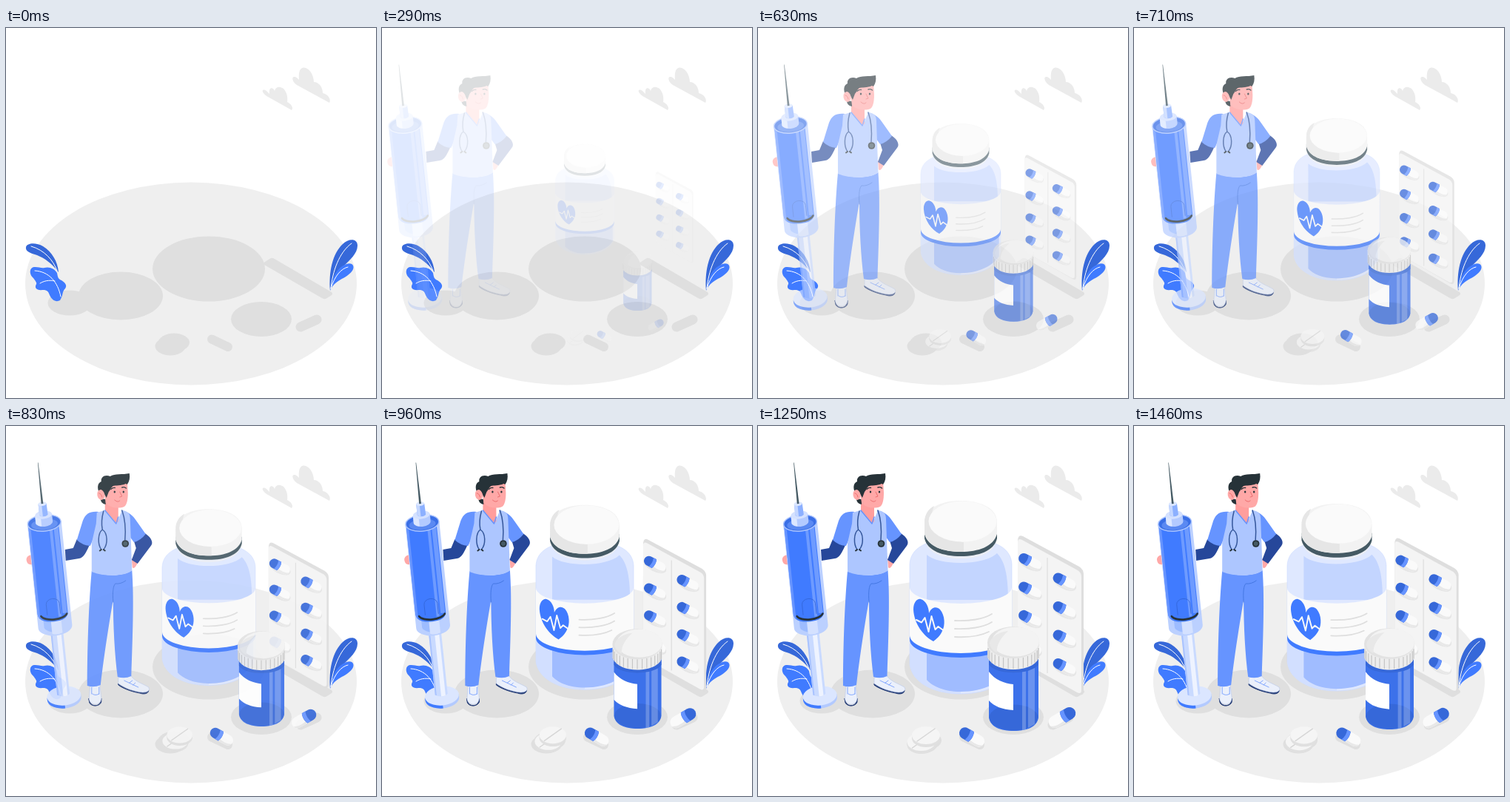
Write an HTML page that moves like this. It is 500x500 px and loops after 1.5 s.

```html
<!DOCTYPE html>
<html lang="en">
<head>
<meta charset="utf-8">
<title>Medicine</title>
<style>
html, body { margin: 0; width: 100%; height: 100%; overflow: hidden; background: #fff; }
svg { display: block; width: 100vw; height: 100vh; }
.line { fill: none; stroke-linecap: round; stroke-linejoin: round; }
</style>
</head>
<body>
<svg viewBox="0 0 500 500">
  <defs>
    <g id="pill">
      <path d="M-1-7H9.500A7 7 0 0 1 9.500 7H-1Z" fill="#fafafa"/>
      <path d="M0 4C5 5 12 5 16 2C16 4 13 7 9.500 7H0Z" fill="#e8e8e8"/>
      <path d="M-1-7H-9.500A7 7 0 0 0-9.500 7H-1C1 3 1-3-1-7Z" fill="#3668d9"/>
      <path d="M-1-7H-6C-4-3-4 3-6 7H-1C1 3 1-3-1-7Z" fill="#6694ff"/>
    </g>
    <g id="blister">
      <ellipse cx="1" cy="1.500" rx="17.500" ry="8.500" transform="rotate(28)" fill="#e6e6e6"/>
      <use href="#pill" transform="rotate(28)"/>
    </g>
    <g id="tablet">
      <path d="M-19 0V4A19 12 0 0 0 19 4V0Z" fill="#e0e0e0"/>
      <ellipse rx="19" ry="12" fill="#f5f5f5"/>
      <path class="line" d="M-12 8L12-9" stroke="#d6d6d6" stroke-width="1.500"/>
    </g>
  </defs>

  <!-- floor -->
  <ellipse cx="250" cy="345.500" rx="224" ry="137" fill="#efefef"/>
  <g fill="#dfdfdf" stroke="#dfdfdf" stroke-width="0" stroke-linecap="round">
    <ellipse cx="274" cy="325.500" rx="76" ry="44"/>
    <ellipse cx="155" cy="362" rx="57" ry="32.500"/>
    <ellipse cx="86" cy="371.500" rx="29.500" ry="17"/>
    <ellipse cx="345" cy="393.500" rx="41" ry="23.500"/>
    <ellipse cx="227" cy="425" rx="21" ry="12.500"/>
    <ellipse cx="222" cy="430" rx="20.500" ry="12.500"/>
    <path d="M278 420.500L300 431" stroke-width="12"/>
    <path d="M398 404L420 394" stroke-width="13"/>
    <path d="M350 316L357 311.500Q359 310 362 311.500L440 357Q442 359 440 361L433 365.500Q430 367 427 365L349 320Q346 318 350 316Z"/>
  </g>

  <!-- clouds -->
  <g fill="#ebebeb">
    <path d="M437 101L393 77C386 72 386 65 390 66C392 66 394 68 396 70C395 60 397 54 402 53.500C409 53 416 63 416 73C423 73 428 80 428 88C435 89 440 97 437 101Z"/>
    <path d="M386 111L354 93C347 89 345 84 348 83.500C351 83 354 87 356 89C355 82 358 79 362 83L363 85C365 78 371 79 375 82C380 87 381 95 380 100C385 102 389 108 386 111Z"/>
  </g>

  <!-- plants -->
  <g fill="#3668d9">
    <path d="M438 355C436 330 441 305 455 292C463 284 475 284 475 294C475 305 464 314 456 322C447 331 440 340 438 355Z"/>
    <path d="M70 329C62 318 52 311 42 307C31 304 26 301 27 296C29 290 41 290 50 295C62 302 70 316 71 330Z"/>
  </g>
  <g fill="#407bff">
    <path d="M438 355C441 335 448 323 460 319C468 316 472 322 468 328C463 335 455 338 449 342C443 346 440 350 438 355Z"/>
    <path d="M73 368C68 371 62 368 59 361C57 356 56 354 50 354C41 355 38 351 41 346C42 344 39 341 37 338C32 334 31 326 36 323.500C42 322 47 325 52 324C58 322 66 325 69 331C70 336 70 339 75 341C80 344 83 348 80 352C76 356 77 360 75 364Z"/>
  </g>
  <path class="line" stroke="#fff" d="M439 352C441 330 450 303 467 291M439 352C444 335 453 325 462 323M34 295C52 300 64 314 69 328M39 328C58 329 70 343 74 363M46 345C54 340 62 341 66 342"/>

  <!-- nurse with syringe -->
  <g id="nurse">
    <path d="M41 174C35 174 32 178 33 182C34 187 38 188 43 187Z" fill="#ffa8a7"/>
    <g transform="translate(57 131) rotate(-6)">
      <path d="M-21 235V239A23 13 0 0 0 25 239V235Z" fill="#b3caff"/>
      <path d="M-21 236V239A23 13 0 0 0 2 252V248Z" fill="#407bff"/>
      <ellipse cx="2" cy="235" rx="23" ry="13" fill="#dbe6ff"/>
      <path d="M-7 145V233Q2 239 10 233V145Z" fill="#c9daff"/>
      <path d="M1 145V236Q5 236 7 235V145Z" fill="#eef3ff"/>
      <path d="M-7 145V233L-5 234V145Z" fill="#a9c3ff"/>
      <path d="M-23 0V141A23 12 0 0 0 23 141V0Z" fill="#bbd0ff"/>
      <path d="M-15 128V141A17 9 0 0 0 6 148V128Z" fill="#9dbcff"/>
      <path d="M-5 130V150Q1 153 9 150V130Z" fill="#d4e1ff"/>
      <path d="M-22 0V122Q-21 134 0 134Q17 134 19 124V0Z" fill="#407bff"/>
      <path d="M-22 4V122Q-21 128-19 129V8Z" fill="#6694ff"/>
      <path d="M6 8H10V128H6ZM12 8H18V124H12Z" fill="#fff" opacity=".24"/>
      <path class="line" d="M-9 124V110A9 7 0 0 1 9 110V124" stroke="#3264d6" stroke-width=".8"/>
      <path class="line" d="M-17.500 125A18 8 0 0 0 17.500 125" stroke="#263238" stroke-width="2.600"/>
      <ellipse rx="22.500" ry="11" fill="#3a6fe6" stroke="#a9c3ff" stroke-width="1.500"/>
      <ellipse cy="2" rx="18" ry="7.500" fill="#5a89f2"/>
      <path d="M-11.500-11V-1A11.500 6 0 0 0 11.500-1V-11Z" fill="#b3caff"/>
      <path d="M-4-9V4Q-8 4-11.500 0V-11Z" fill="#dce7ff"/>
      <ellipse cy="-11" rx="11.500" ry="5.500" fill="#d4e1ff"/>
      <path d="M-5.500-26V-11A6 3 0 0 0 6-11L5.500-26Z" fill="#8cb0ff"/>
      <path d="M-5.500-26V-11L-1-8V-26Z" fill="#c5d7ff"/>
      <ellipse cy="-26" rx="5.500" ry="2.800" fill="#dce7ff"/>
      <path d="M-1.500-26L-.3-82H.3L1.300-26Z" fill="#455a64"/>
    </g>

    <!-- shoes -->
    <path d="M117 368C118 381 134 381 134 368L134 373C132 379 121 380 118 374ZM157 348C170 357 182 360 198 357C198 362 191 363 186 361C174 359 162 354 157 350Z" fill="#263e78" stroke="#263e78"/>
    <g fill="#ebf0fb" stroke="#b9c8ea" stroke-width=".6">
      <path d="M119 349H132L134 368C133 378 120 379 117.500 369Z"/>
      <path d="M157 340L173 336C178 345 190 348 198 353C200 357 197 360 190 360C178 359 165 354 157 348Z"/>
    </g>
    <path class="line" stroke="#6694ff" stroke-width=".8" d="M121 353V362M131 353V362M122 362Q126 365 131 362M165 344L184 353M172 347L176 344M177 350L180 347"/>

    <path d="M121 196C140 204 165 203 175.500 195C178 230 177 270 174.500 338Q166 342 156 339C152 310 150 270 150 235C147 252 139 300 133 350Q124 354 115 351C115 300 117 240 121 196Z" fill="#6694ff"/>
    <path class="line" stroke="#4477e3" d="M150 238C149 224 150 216 153 213Q160 214 167 209"/>

    <!-- arms -->
    <path d="M101 153L118 161C113 172 110 178 104 179L86 182L85 167L96 165Z" fill="#26479a"/>
    <path d="M175 179L184 182C182 189 178 194 176 191Z" fill="#ffa8a7"/>
    <path d="M193 145C201 150 205 157 201 162L183 186L175 181L181 165L178 155Z" fill="#26479a"/>
    <path d="M130 116C119 115 113 118 109 128L101 154Q108 161 119 162L132 132ZM161 114C171 116 177 121 182 129L194 146Q187 155 178 157L164 138Z" fill="#6694ff"/>
    <path d="M128 117L142 113L155 131L162 114C170 115 173 118 173 126L175.500 195C169 202 141 205 121 197L121 158L127 132Z" fill="#adc6ff"/>

    <!-- head -->
    <path d="M139 100L157 108V129L154 132L139 114Z" fill="#ff9e9d"/>
    <path class="line" d="M139 114L154 132L157 123" stroke="#6694ff" stroke-width="1.500"/>
    <path d="M133 98L140 99V106C135 105 133 102 133 98Z" fill="#263238"/>
    <path d="M137 82L140 104C146 111 158 112 165 109C169 106 170 98 170 90L169 74H150Z" fill="#ffa8a7"/>
    <path d="M131 90C128 83 129 77 134 75C133 69 139 65 146 68C152 64 163 66 172 64C173 70 172 75 169 79L167 78C161 81 153 80 150 81C147 83 146 87 144 89L141 97L137 90Z" fill="#263238"/>
    <ellipse cx="133.500" cy="93" rx="5" ry="7" transform="rotate(-12 133.500 93)" fill="#ffa8a7"/>
    <g fill="#263238"><ellipse cx="152" cy="89" rx="1.200" ry="1.600"/><ellipse cx="164" cy="89" rx="1.200" ry="1.600"/></g>
    <path class="line" d="M147 85.500Q149 83 152.500 83.500M162 83Q165 82 167.500 84" stroke="#263238" stroke-width="1.400"/>
    <path class="line" d="M159 89L162 95L159 96M152 100Q156 104 159 101M131 91Q134 91 135 96" stroke="#ec6f70"/>

    <!-- stethoscope -->
    <path class="line" stroke="#34569a" stroke-width="1.500" d="M137 115C134 126 134 133 135.500 140C129 145 129 160 134 167M135.500 140C143 145 143 160 137 167M162 114C167 128 167 142 166 154"/>
    <path class="line" stroke="#263238" stroke-width="2" d="M134 167L132 168.500M137 167L139 168.500"/>
    <circle cx="166.500" cy="159" r="4.800" fill="#263238"/>
    <circle cx="166.500" cy="159" r="3" fill="#455a64"/>
  </g>

  <!-- large bottle -->
  <g id="bottle">
    <path d="M205 187C206 166 225 152 274 152C323 152 342 166 343 187V322C340 346 312 362 274 362C236 362 208 346 205 322Z" fill="#dfe8ff" stroke="#c9d9ff" stroke-width=".6"/>
    <path d="M228 174C245 189 305 189 323 172C333 182 338 200 338 235H228Z" fill="#c3d5ff"/>
    <path d="M205 285V322C208 346 236 362 274 362V285Z" fill="#d2dfff"/>
    <path d="M228 295H340V330C330 346 305 359 274 359C250 359 235 351 228 343Z" fill="#a0bcff"/>
    <path d="M205 218A69 22 0 0 0 343 218V284A69 24 0 0 1 205 284Z" fill="#fafafa"/>
    <path d="M205 283A69 24 0 0 0 343 283V289A69 24 0 0 1 205 289Z" fill="#407bff"/>
    <path d="M237 291C224 284 211 268 210 248C210 238 215 233 220 234C227 236 231 245 231 253C234 245 241 243 246 248C253 256 253 270 249 277C246 284 241 288 237 291Z" fill="#407bff"/>
    <path class="line" stroke="#fafafa" stroke-width="2" d="M214 262L221 265.500L225.500 259L230.500 278L234.500 257L239.500 275L243.500 271L251 276.500"/>
    <path class="line" stroke="#dedede" stroke-width="1.800" d="M266 263C285 264 305 261 316 254M266 274C285 275 305 272 316 265M266 285C285 286 300 284 312 278"/>
    <path d="M228 152V160C236 186 312 186 320 160V152Z" fill="#eaedf5"/>
    <path d="M225 142V152C229 169 250 176 274 176C298 176 319 169 323 152V142Z" fill="#455a64"/>
    <path d="M225 130C225 111 247 101 274 101C301 101 323 111 323 130V146C318 163 298 170 274 170C250 170 230 163 225 146Z" fill="#f2f2f2"/>
    <path d="M225 130C225 120 230 112 238 108C228 130 242 152 278 157V170C249 170 230 163 225 146Z" fill="#e6e6e6"/>
    <ellipse cx="276.500" cy="129" rx="46" ry="27.500" fill="#fafafa"/>
  </g>

  <!-- blister pack -->
  <g id="pack">
    <path d="M351 154Q352 146 358 149L434 190Q440 194 440 200V358Q440 366 433 362L356 318Q351 315 351 310Z" fill="#dedede"/>
    <path d="M351 157Q351 151 357 154L432 195Q437 198 437 204V357Q437 363 431 360L356 318Q351 315 351 310Z" fill="#f4f4f4"/>
    <path d="M391 178V334" stroke="#dcdcdc" stroke-width="1.200"/>
    <g id="rows"></g>
  </g>

  <!-- small bottle -->
  <g id="jar">
    <path d="M312 312V394C314 407 328 412 345.500 412C363 412 377 407 379 394V312Z" fill="#3c71ea"/>
    <ellipse cx="345.500" cy="394" rx="33" ry="17.500" fill="#3668d9"/>
    <path d="M357 318H362V410L357 411ZM365 318H374V403L365 408Z" fill="#fff" opacity=".24"/>
    <path d="M312 314V322C320 337 370 337 379 322V314Z" fill="#3668d9"/>
    <path d="M312 332C320 343 333 348 345 349V384C330 383 319 379 312 371Z" fill="#fff"/>
    <path d="M310 292V312C315 324 330 329 345 329C360 329 376 324 380 312V292Z" fill="#ededed"/>
    <g id="ridges" stroke="#c4c4c4" stroke-width="1.200"></g>
    <ellipse cx="345" cy="292.500" rx="35" ry="21.500" fill="#e2e2e2"/>
    <ellipse cx="348" cy="291.500" rx="32" ry="20" fill="#f3f3f3"/>
    <path d="M323 306C322 296 328 286 338 277C326 278 314 285 313 294C314 300 318 304 323 306Z" fill="#e8e8e8"/>
  </g>

  <!-- loose pills -->
  <g id="pills">
    <use href="#tablet" x="220.500" y="427"/>
    <use href="#tablet" x="227" y="418"/>
    <use href="#pill" transform="translate(289 420.500) rotate(30) scale(1.120)"/>
    <use href="#pill" transform="translate(411 394) rotate(150) scale(1.200 -1.200)"/>
  </g>
</svg>
<script>
const $ = id => document.getElementById(id);

let rows = "";
for (let i = 0; i < 4; i++) {
  rows += `<use href="#blister" x="367.500" y="${183.5 + i * 38.4}"/>`;
  rows += `<use href="#blister" x="414" y="${210 + i * 38.5}"/>`;
}
$("rows").innerHTML = rows;

let ridges = "";
for (let a = -1.4; a < 1.45; a += 0.2) {
  const x = 345 + 34.5 * Math.sin(a), y = 311 + 17 * Math.cos(a);
  ridges += `<path d="M${x} ${y}V${y - 14}"/>`;
}
$("ridges").innerHTML = ridges;

const LOOP = 1500, FPS = 24;
// [step, phase]: 0 hidden, 1 fully shown, above 1 leaving again
const keys = [[0, 0], [11, 0.392], [15, 0.542], [20, 0.726], [26, 0.893], [30, 1], [36, 1.19]];
const pivots = { bottle: [274, 231.5], pack: [395, 256], jar: [345, 342], pills: [315.5, 411.5] };

function progress(step) {
  let i = 1;
  while (i < keys.length - 1 && step > keys[i][0]) i++;
  const [s0, p0] = keys[i - 1], [s1, p1] = keys[i];
  const phase = p0 + (p1 - p0) * (step - s0) / (s1 - s0);
  return Math.sin(phase * Math.PI / 2) ** 2;
}

function pose(id, p, transform) {
  $(id).setAttribute("opacity", Math.min(1, p * 1.1));
  $(id).setAttribute("transform", transform);
}

function draw(ms) {
  const p = progress(Math.floor((ms % LOOP + 5) * FPS / 1000));
  pose("nurse", p, `translate(${-30 * (1 - p)} 0)`);
  const s = 0.5 + p / 2;
  for (const id in pivots) {
    const [x, y] = pivots[id];
    pose(id, p, `translate(${x} ${y}) scale(${s}) translate(${-x} ${-y})`);
  }
}

const start = performance.now();
function tick() {
  draw(performance.now() - start);
  requestAnimationFrame(tick);
}
tick();
</script>
</body>
</html>
```
